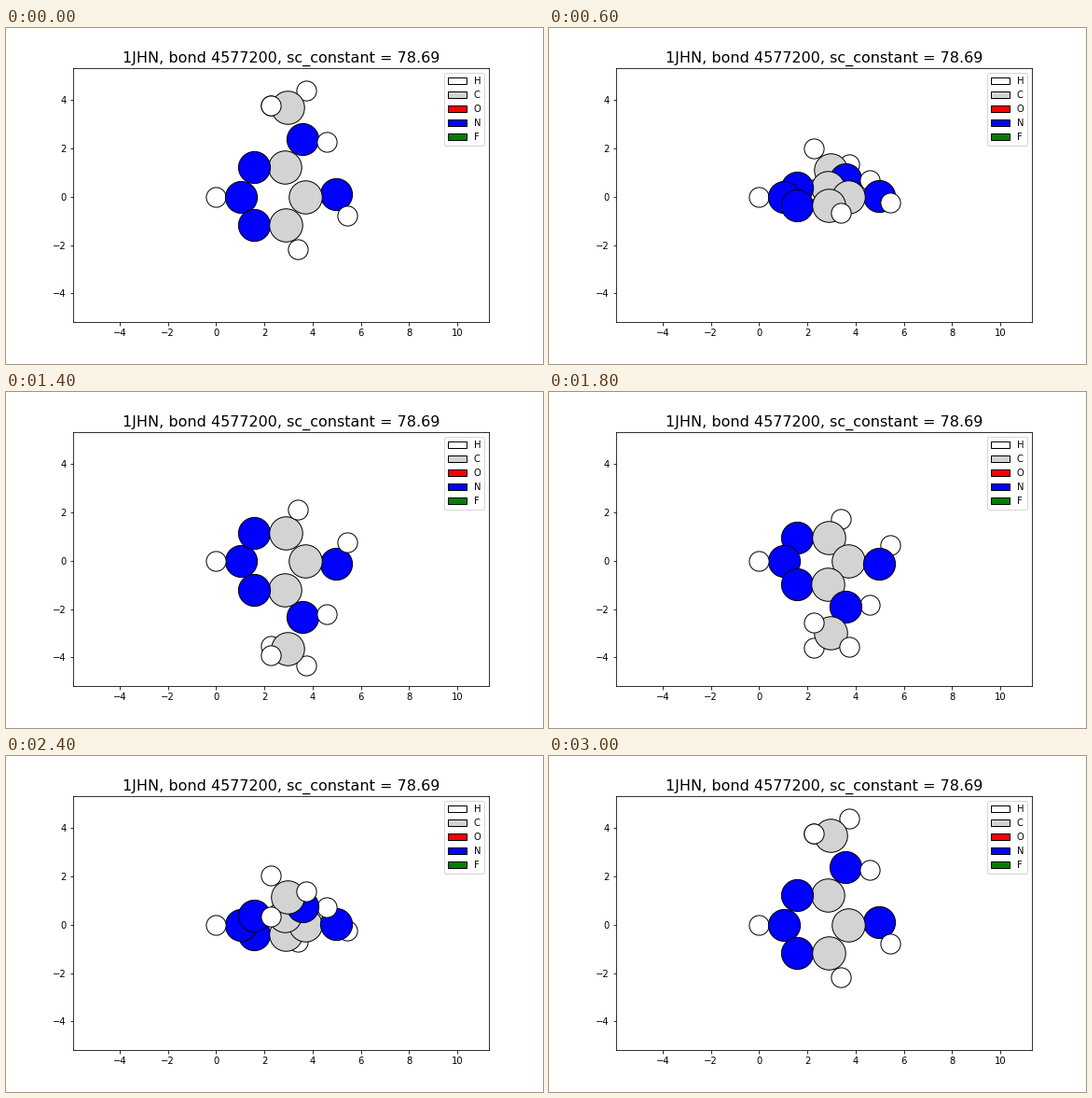
Recreate the animation shown at these times as a matplotlib script. Size 576x360 px, loop 3.2 s.

```python
import numpy as np
import matplotlib.pyplot as plt
from matplotlib.animation import FuncAnimation
from matplotlib.patches import Patch

FRAMES = 16
SCALE = 25.875            # pixels per unit on both axes
ORIGIN = (225.3, 180.9)   # pixel position of (0, 0), from the top left
WIDTH, HEIGHT = 576, 360
LEFT, RIGHT, BOTTOM, TOP = 0.125, 0.9, 0.125, 0.88

COLORS = {"H": "white", "C": "lightgray", "O": "red", "N": "blue", "F": "green"}
RADII = {"H": 25, "C": 70, "N": 65}
TILT = 0.008              # slight lean of the molecular plane

# element, x, y, z offset from the plane
ATOMS = [
    ("H", 0.0, 0.0, 0.0),
    ("N", 1.015, -1e-6, -1e-6),
    ("N", 1.585, 1.215, 0.0),
    ("N", 1.585, -1.175, 0.0),
    ("C", 2.86, 1.22, 0.0),
    ("C", 2.90, -1.175, 0.0),
    ("C", 3.68, 0.0, 0.0),
    ("N", 4.99, 0.13, 0.0),
    ("N", 3.57, 2.38, 0.0),
    ("C", 2.95, 3.71, 0.0),
    ("H", 3.72, 4.42, 0.0),
    ("H", 2.285, 3.80, -0.89),
    ("H", 2.285, 3.80, 0.88),
    ("H", 4.57, 2.265, 0.0),
    ("H", 3.375, -2.155, 0.0),
    ("H", 5.425, -0.79, 0.0),
]
x, y, z = np.array([a[1:] for a in ATOMS]).T
z = z + TILT * y

fig = plt.figure(figsize=(WIDTH / 72, HEIGHT / 72), dpi=72, facecolor="white")
fig.subplots_adjust(left=LEFT, right=RIGHT, bottom=BOTTOM, top=TOP)
ax = fig.add_subplot()
ax.set_xlim((LEFT * WIDTH - ORIGIN[0]) / SCALE, (RIGHT * WIDTH - ORIGIN[0]) / SCALE)
ax.set_ylim((ORIGIN[1] - (1 - BOTTOM) * HEIGHT) / SCALE,
            (ORIGIN[1] - (1 - TOP) * HEIGHT) / SCALE)
ax.set_title("1JHN, bond 4577200, sc_constant = 78.69", fontsize=16)
ax.legend(handles=[Patch(facecolor=c, edgecolor="black", label=e)
                   for e, c in COLORS.items()], loc="upper right")

balls = [ax.scatter([px], [py], s=18 * RADII[e], c=COLORS[e],
                    edgecolors="black", linewidths=1)
         for (e, *_), px, py in zip(ATOMS, x, y)]


def update(i):
    """Turn the molecule about the x axis and stack atoms by depth."""
    angle = 2 * np.pi * i / (FRAMES - 1)
    c, s = np.cos(angle), np.sin(angle)
    height = y * c - z * s
    depth = y * s + z * c
    for rank, k in enumerate(np.argsort(-depth, kind="stable")):
        balls[k].set_offsets([(x[k], height[k])])
        balls[k].set_zorder(1 + rank / 100)
    return balls


anim = FuncAnimation(fig, update, frames=FRAMES, interval=200,
                     repeat=True, repeat_delay=0, blit=False)
plt.show()
```
